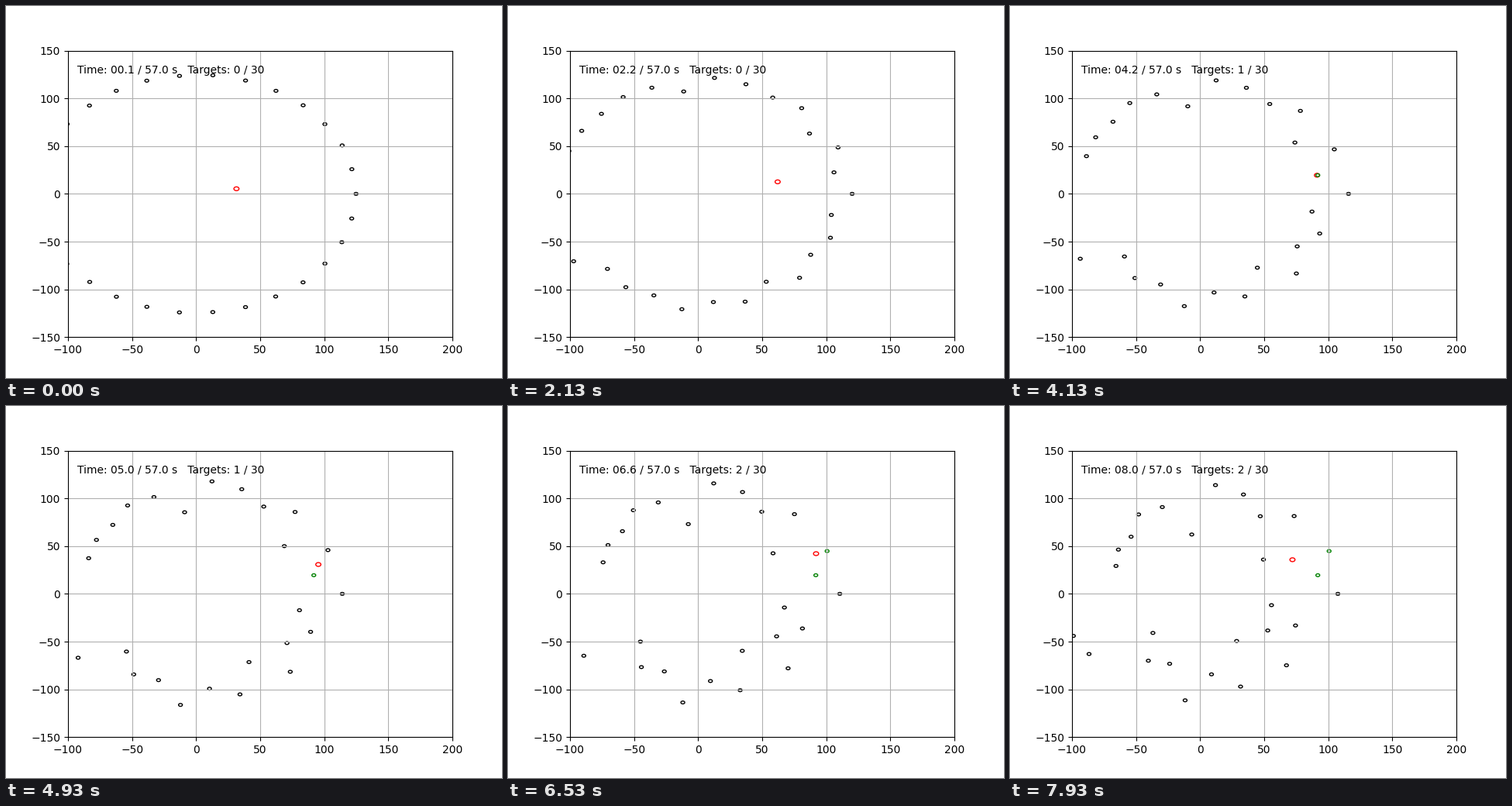
A matplotlib script for the animation above (8 s loop, 640x480 px).

```python
import numpy as np
import matplotlib.pyplot as plt
from matplotlib.animation import FuncAnimation
from matplotlib.patches import Circle

FRAMES, INTERVAL = 80, 100
START_RADIUS = 125

# Inward speed of each target, counter-clockwise from the positive x axis
SPEEDS = np.array([
    2.19, 7.55, 2.475, 7.99, 1.92, 3.89, 1.95, 1.31, 7.81, 3.68,
    3.62, 5.56, 5.77, 6.64, 2.0, 2.0, 2.0, 2.09, 2.23, 8.74,
    5.52, 6.0, 1.61, 5.03, 2.86, 8.5, 3.04, 7.47, 5.44, 8.51])
ANGLES = 2 * np.pi * np.arange(len(SPEEDS)) / len(SPEEDS)

# Moment at which a target is caught and stops
CAUGHT = np.full(len(SPEEDS), np.inf)
CAUGHT[1], CAUGHT[2] = 4.12, 5.99

# Chaser route: time, x, y
ROUTE = np.array([[0, 30, 5], [4.2, 91.2, 19.5],
                  [6, 100.6, 44.85], [8, 72.05, 35.75]])

fig, ax = plt.subplots(figsize=(6.4, 4.8), dpi=100)
ax.set_xlim(-100, 200)
ax.set_ylim(-150, 150)
ax.set_xticks(range(-100, 201, 50))
ax.set_yticks(range(-150, 151, 50))
ax.grid(True)


def ring(radius, color):
    return ax.add_patch(Circle((0, 0), radius, fill=False, ec=color, lw=1))


chaser = ring(2, "red")
targets = [ring(1.5, "black") for _ in SPEEDS]
label = ax.text(0.025, 0.92, "", transform=ax.transAxes)


def update(i):
    t = (i + 1) / 10
    done = CAUGHT <= t
    r = START_RADIUS - SPEEDS * np.minimum(t, CAUGHT)
    for ring_, x, y, hit in zip(targets, r * np.cos(ANGLES),
                                r * np.sin(ANGLES), done):
        ring_.center = x, y
        ring_.set_edgecolor("green" if hit else "black")
    chaser.center = [np.interp(t, ROUTE[:, 0], ROUTE[:, c]) for c in (1, 2)]
    label.set_text(f"Time: {t:04.1f} / 57.0 s   "
                   f"Targets: {done.sum()} / {len(SPEEDS)}")
    return [chaser, label, *targets]


anim = FuncAnimation(fig, update, frames=FRAMES, interval=INTERVAL,
                     repeat=True, repeat_delay=0)
plt.show()
```
